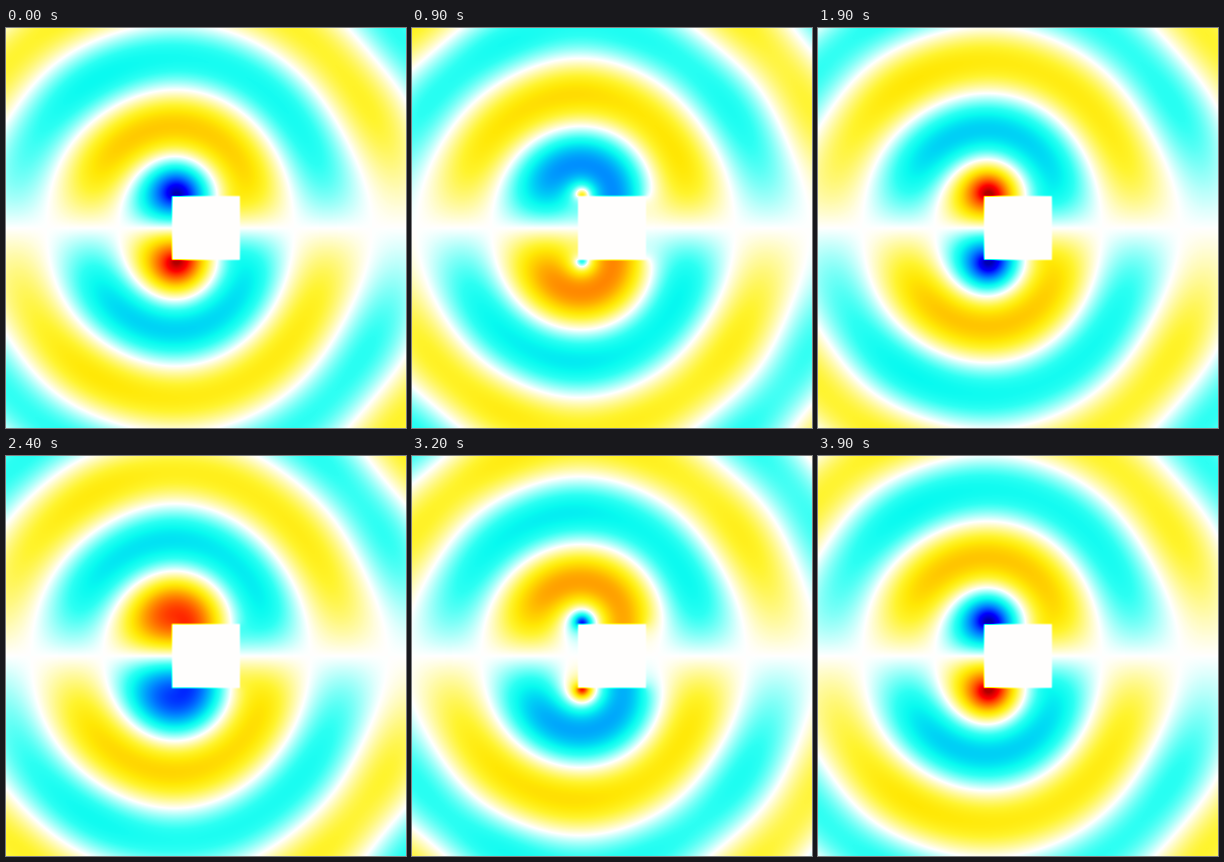
Recreate the animation shown at these times as a matplotlib script. Size 400 by 400 pixels, loop 4000 ms.

```python
import numpy as np
import matplotlib.pyplot as plt
from matplotlib.animation import FuncAnimation
from matplotlib.colors import LinearSegmentedColormap

SIZE = 400          # stage in pixels
CELL = 2            # grid spacing in pixels
PAD = 60            # absorbing margin in cells
WAVELENGTH = 134    # pixels
STEPS = 96          # solver steps per period
PERIODS = 10
FRAMES = 40
VMAX = 3.0


def make_cmap():
    """White at zero, warm colours above it and cold ones below."""
    warm = [(0.6, (255, 244, 45)), (0.8, (255, 232, 5)), (1.0, (255, 205, 0)),
            (2.15, (255, 0, 0)), (3.0, (175, 0, 0))]
    cold = [(0.6, (45, 255, 243)), (0.8, (8, 250, 240)), (1.0, (0, 215, 245)),
            (1.4, (0, 140, 255)), (2.15, (0, 0, 255)), (3.0, (0, 0, 175))]
    stops = [(-v, c) for v, c in reversed(cold)]
    stops += [(0, (255, 255, 255))] + warm
    nodes = [((v + VMAX) / (2 * VMAX), np.array(c) / 255) for v, c in stops]
    return LinearSegmentedColormap.from_list("wave", nodes, N=1024)


def solve_wave():
    """Complex amplitude of the upper half; the lower half is its negative."""
    half, full = SIZE // 2 // CELL, SIZE // CELL
    x = (np.arange(-PAD, full + PAD) + 0.5) * CELL
    y = (np.arange(-PAD, half) + 0.5) * CELL
    X, Y = np.meshgrid(x, y)

    # rigid box in the middle of the stage
    fluid = ~((np.abs(X - 200) < 35) & (Y > 168))
    open_x = fluid[:, 1:] & fluid[:, :-1]
    open_y = fluid[1:] & fluid[:-1]

    emitter = np.exp(-((X - 170) ** 2 + (Y - 167) ** 2) / 18) * fluid

    depth = np.maximum.reduce([-X, X - SIZE, -Y, 0 * X]) / (PAD * CELL)
    damp = 0.09 * depth ** 2
    courant2 = (WAVELENGTH / CELL / STEPS) ** 2
    omega = 2 * np.pi / STEPS

    u = np.zeros_like(X)
    prev = np.zeros_like(X)
    amp = np.zeros(X.shape, complex)
    for n in range(PERIODS * STEPS):
        flux_x = np.diff(u, axis=1) * open_x
        flux_y = np.diff(u, axis=0) * open_y
        lap = np.zeros_like(u)
        lap[:, :-1] += flux_x
        lap[:, 1:] -= flux_x
        lap[:-1] += flux_y
        lap[1:] -= flux_y
        lap[-1] -= 2 * u[-1]        # zero on the mirror line

        ramp = np.sin(np.pi / 2 * min(n / (2 * STEPS), 1)) ** 2
        drive = ramp * np.sin(omega * n) * emitter
        new = (2 * u - (1 - damp) * prev + courant2 * lap + drive) / (1 + damp)
        prev, u = u, new
        if n >= (PERIODS - 1) * STEPS:
            amp += u * np.exp(1j * omega * n)

    amp = amp[PAD:, PAD:PAD + full]
    # unit crest above the emitter at time zero
    return amp / amp[95 // CELL, 172 // CELL]


upper = solve_wave()
field = np.vstack([upper, -upper[::-1]])


def snapshot(i):
    return np.real(field * np.exp(-2j * np.pi * i / FRAMES))


fig = plt.figure(figsize=(4, 4), dpi=100)
ax = fig.add_axes([0, 0, 1, 1])
ax.axis("off")
image = ax.imshow(snapshot(0), cmap=make_cmap(), vmin=-VMAX, vmax=VMAX,
                  interpolation="bilinear", extent=(0, SIZE, SIZE, 0),
                  aspect="auto")


def update(i):
    image.set_data(snapshot(i))
    return [image]


anim = FuncAnimation(fig, update, frames=FRAMES, interval=100, repeat=True,
                     repeat_delay=0)
plt.show()
```
